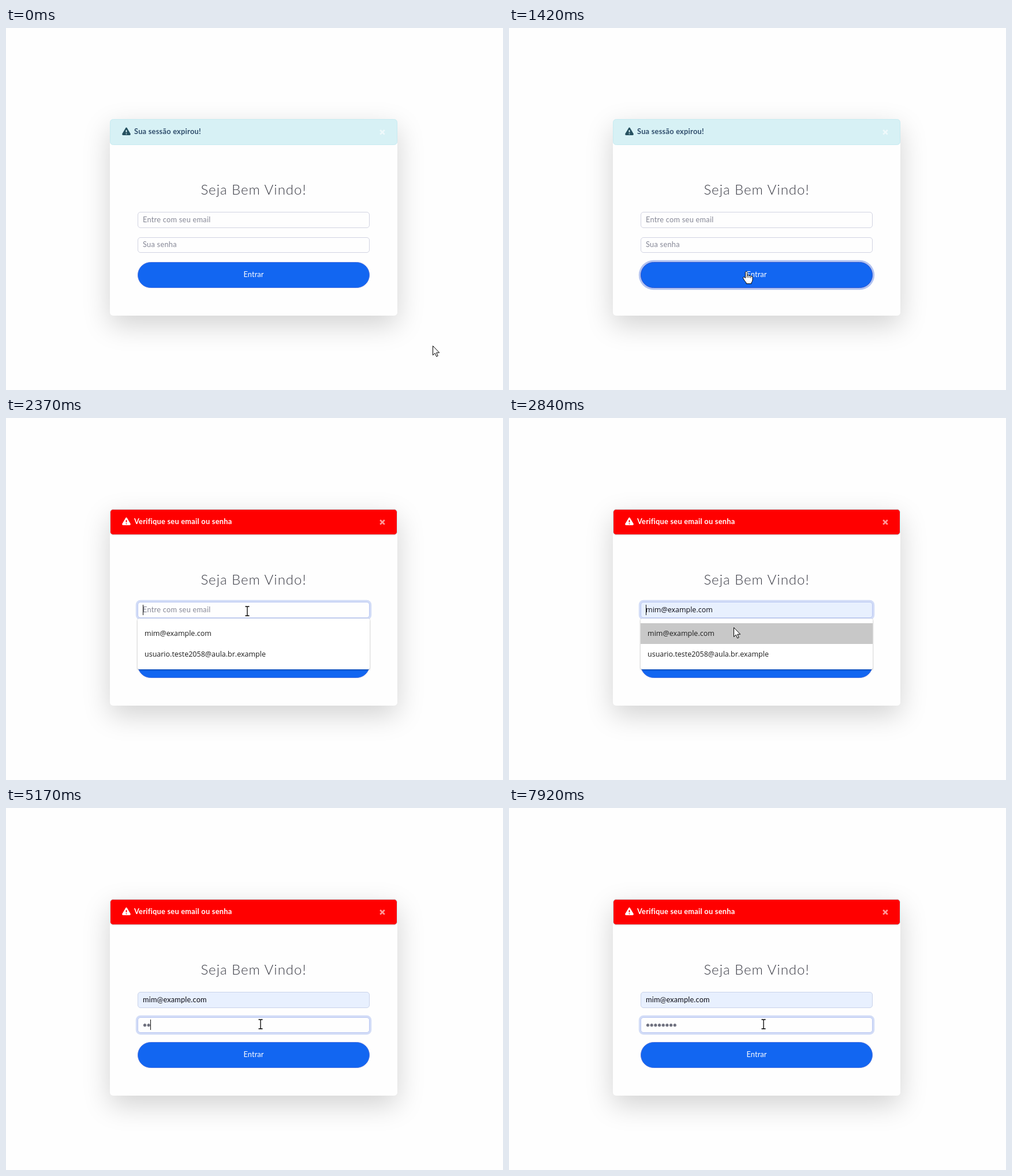
Animation of 861 by 628 pixels, one loop 8 s. Source, as an HTML page:

```html
<!DOCTYPE html>
<html lang="pt-BR">
<head>
<meta charset="utf-8">
<title>Seja Bem Vindo!</title>
<style>
  html, body { margin: 0; width: 100%; height: 100%; overflow: hidden; background: #fefefe; }
  body { position: relative; font: 12.8px Lato, sans-serif; letter-spacing: .25px; }
  body * { box-sizing: border-box; }
  .abs, .field, .caret, .row, .cursor { position: absolute; }

  .card { left: 180px; top: 158px; width: 498px; height: 341px; border-radius: 5.6px;
    background: #fefefe; box-shadow: 0 16px 48px rgba(0, 0, 0, .175); }
  .alert { left: 180px; top: 158px; width: 498px; height: 45px; padding-left: 41px;
    border: 1px solid #c7ebf1; border-radius: 5.6px; background: #d7f1f5;
    color: #2f4d6c; font-weight: 700; line-height: 41px; }
  .alert svg { position: absolute; left: 0; top: 0; }
  .sign { fill: #25505f; }
  .mark { stroke: #d7f1f5; }
  .cross { stroke: #fff; opacity: .6; }
  .error .alert { background: #f00; color: #fff; }
  .error .sign { fill: #fff; }
  .error .mark { stroke: #f00; }

  h1 { margin: 0; left: 180px; top: 265px; width: 498px; text-align: center;
    font-size: 24px; font-weight: 300; line-height: 30px; letter-spacing: 1px; color: #3a3b45; }

  .field { left: 228px; width: 402px; padding-left: 8px; border: 1px solid #d1d3e2;
    border-radius: 5px; background: #fefefe; color: #858796; white-space: nowrap; }
  .email { top: 319px; height: 28px; line-height: 24px; }
  .password { top: 363px; height: 27px; line-height: 23px; }
  .filled { background: #e8f0fe; color: #0b0b14; border-color: #c9d3ea; letter-spacing: .15px; }
  .preview { font: 12.5px/25px "Open Sans", sans-serif; letter-spacing: 0; }
  .focus { border-color: #bac8f3; box-shadow: 0 0 0 3.2px rgba(78, 115, 223, .25); }
  .caret { width: 1px; height: 18px; top: 4px; background: #111; }
  .password .caret { top: 3px; }
  .dots { display: inline-block; height: 18px; margin-top: 3px; vertical-align: top;
    background: radial-gradient(circle at 3.5px 9.8px, #6e707e 2.3px, transparent 3px) 0 0 / 6.7px 18px; }

  .button { left: 228px; top: 406px; width: 402px; height: 45px; border: 1px solid #4e73df;
    border-radius: 23px; background: #1266f1; color: #fff; text-align: center; line-height: 40px;
    letter-spacing: .1px; }
  .button.hover { border-color: #2653d4; }
  .button.focus { box-shadow: 0 0 0 3.2px rgba(105, 136, 228, .5); }

  .popup { left: 228px; top: 348px; width: 402px; height: 88px; border-radius: 3px;
    background: #fff; box-shadow: 0 1px 3px rgba(0, 0, 0, .35);
    font: 12.5px/36px "Open Sans", sans-serif; letter-spacing: 0; color: #1c1c1c; }
  .row { left: 0; width: 100%; height: 36px; padding-left: 12px; }
  .row.active { background: #c8c8c8; }

  .cursor { left: 0; top: 0; width: 1px; height: 1px; overflow: visible; }
  .cursor path { fill: #fff; stroke: #000; stroke-width: 1; stroke-linejoin: round; }
  .cursor .beam { fill: none; stroke-width: 1.3; }
  [hidden] { display: none !important; }
</style>
</head>
<body>
  <div class="abs card"></div>
  <div class="abs alert">
    <svg width="496" height="43" viewBox="181 159 496 43">
      <path class="sign" d="M207.2 173.4Q208.5 171.8 209.8 173.4L215.7 183.6Q216.3 185.7 214.4 186H202.6Q200.7 185.7 201.3 183.6Z"/>
      <path class="mark" d="M208.5 177V181M208.5 182.7V184.3" stroke-width="1.8"/>
      <path class="cross" d="M648.2 177L655.8 184.6M655.8 177L648.2 184.6" stroke-width="2.7"/>
    </svg>
    <span id="message"></span>
  </div>
  <h1 class="abs">Seja Bem Vindo!</h1>
  <div class="field email" id="email"><span id="emailText"></span><i class="caret" id="emailCaret"></i></div>
  <div class="field password" id="password"><span id="hint">Sua senha</span><span class="dots" id="dots"></span><i class="caret" id="passwordCaret"></i></div>
  <div class="abs button" id="button">Entrar</div>
  <div class="abs popup" id="popup">
    <div class="row" id="choice" style="top:8px">mim@example.com</div>
    <div class="row" style="top:44px">usuario.teste2058@aula.br.example</div>
  </div>
  <svg class="cursor" id="cursor">
    <path id="arrow" d="M.5 .5V16.6L4.2 13.1L6.7 18.9L9.2 17.8L6.7 12.2H11.7Z"/>
    <g id="hand">
      <path d="M-1.5 1.2Q0-1.4 1.5 1.2V7.2Q3.6 5.6 4.7 7.7Q6.7 6.4 7.8 8.5Q10.6 7.5 11 10.3V15Q10.8 18 9 19.5V21.6H0V19.8Q-2.8 17-4.8 13.2Q-6.4 10.7-4.7 9.9Q-3.3 9.6-1.5 12Z"/>
      <path d="M1.5 7V11M4.7 8V11.3M7.8 9V11.8"/>
    </g>
    <path id="beam" class="beam" d="M-3.5-8H-1Q0-8 0-7Q0-8 1-8H3.5M0-7V7M-3.5 8H-1Q0 8 0 7Q0 8 1 8H3.5"/>
  </svg>
<script>
  const LOOP = 8000;
  const CLICK = 1180, RELOAD = 1590, EMAIL = 2340, HOVER_ROW = 2760, PICK = 3770, PASSWORD = 4100;
  const keys = [5020, 5170, 5420, 5570, 5880, 6100, 6180, 6350];
  const DOT = 6.7;

  // time, x, y of the pointer's hot spot
  const path = [
    [50, 739, 551], [400, 530, 232], [520, 512, 240], [870, 412, 418], [1040, 411, 419],
    [1420, 411, 422], [1590, 411, 422], [1990, 418, 339], [2300, 418, 335], [2640, 418, 335],
    [2840, 389, 363], [3370, 445, 372], [4040, 445, 372], [4320, 441, 375]
  ];

  const el = {};
  document.querySelectorAll('[id]').forEach(node => el[node.id] = node);

  const within = (t, from, to) => t >= from && t < to;
  const show = (node, on) => node.toggleAttribute('hidden', !on);
  const inside = ([x, y], top, bottom) => x >= 228 && x < 630 && y >= top && y < bottom;

  function pointerAt(t) {
    const next = path.findIndex(p => p[0] > t);
    if (next === 0) return path[0].slice(1);
    if (next < 0) return path[path.length - 1].slice(1);
    const [t0, x0, y0] = path[next - 1], [t1, x1, y1] = path[next];
    const k = (t - t0) / (t1 - t0);
    return [x0 + (x1 - x0) * k, y0 + (y1 - y0) * k];
  }

  function drawPointer(t, open) {
    const at = pointerAt(t);
    const hand = inside(at, 406, 451) && !open;
    const beam = inside(at, 319, 347) || (inside(at, 363, 390) && !open);
    show(el.hand, hand);
    show(el.beam, beam);
    show(el.arrow, !hand && !beam);
    el.cursor.style.transform = `translate(${Math.round(at[0])}px, ${Math.round(at[1])}px)`;
    el.button.classList.toggle('hover', hand);
  }

  function render(t) {
    const open = within(t, EMAIL, PICK);
    const preview = within(t, HOVER_ROW, PICK);
    const filled = t >= HOVER_ROW;
    const typed = keys.filter(k => t >= k).length;

    document.body.classList.toggle('error', t >= RELOAD);
    el.message.textContent = t < RELOAD ? 'Sua sessão expirou!' : 'Verifique seu email ou senha';
    el.button.classList.toggle('focus', within(t, CLICK, RELOAD));

    el.emailText.textContent = filled ? el.choice.textContent : 'Entre com seu email';
    el.email.classList.toggle('filled', filled);
    el.email.classList.toggle('preview', preview);
    el.email.classList.toggle('focus', within(t, EMAIL, PASSWORD));
    show(el.emailCaret, within(t, EMAIL, PASSWORD) && !within(t, 2900, 3370));
    el.emailCaret.style.left = t < PICK ? '8px' : 'auto';

    show(el.popup, open);
    el.choice.classList.toggle('active', preview);

    el.password.classList.toggle('focus', t >= PASSWORD);
    show(el.hint, !typed);
    show(el.dots, typed > 0);
    el.dots.style.width = typed * DOT + 'px';
    show(el.passwordCaret, within(t, PASSWORD, 4640) || within(t, keys[0], 6900) || within(t, 7450, 7920));
    el.passwordCaret.style.left = Math.round(8 + typed * DOT) + 'px';

    drawPointer(t, open);
  }

  const start = performance.now();
  function tick() {
    render((performance.now() - start) % LOOP);
    requestAnimationFrame(tick);
  }
  tick();
</script>
</body>
</html>
```
